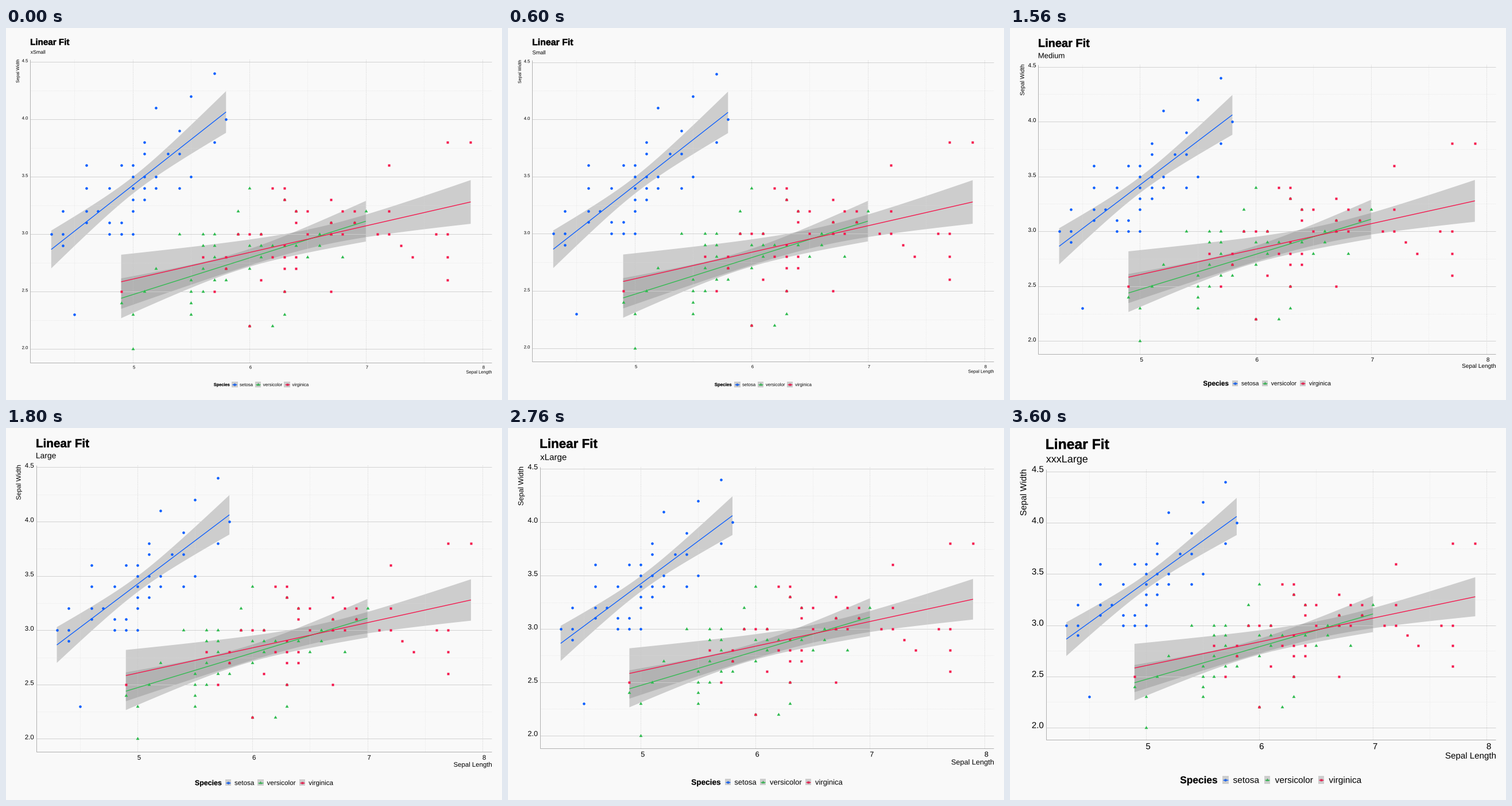
Write a matplotlib script that moves like this. It is 864 by 648 pixels and loops after 4.2 s.

```python
import numpy as np
import matplotlib.pyplot as plt
from matplotlib.animation import FuncAnimation
from matplotlib.patches import PathPatch, Rectangle
from matplotlib.path import Path
from matplotlib.textpath import TextPath

W, H = 864, 648
RIGHT = 846
XLIM, YLIM = (4.12, 8.08), (1.88, 4.52)
BACK, RIBBON = "#f9f9f9", "#8b8b8b"
TRIANGLE = [(0, 1.5546), (1.3464, -0.7773), (-1.3464, -0.7773), (0, 1.5546)]
T_CRIT = 2.0106

# Sepal length -> sepal widths, in millimetres
SETOSA = {
    43: [30], 44: [29, 30, 32], 45: [23], 46: [31, 32, 34, 36], 47: [32],
    48: [30, 31, 34], 49: [30, 31, 36], 50: [30, 32, 33, 34, 35, 36],
    51: [33, 34, 35, 37, 38], 52: [34, 35, 41], 53: [37], 54: [34, 37, 39],
    55: [35, 42], 57: [38, 44], 58: [40],
}
VERSICOLOR = {
    49: [24], 50: [20, 23], 51: [25], 52: [27], 54: [30],
    55: [23, 24, 25, 26], 56: [25, 27, 29, 30], 57: [26, 28, 29, 30],
    58: [26, 27], 59: [30, 32], 60: [22, 27, 29, 34], 61: [28, 29, 30],
    62: [22, 29], 63: [23, 25, 33], 64: [29, 32], 65: [28], 66: [29, 30],
    67: [30, 31], 68: [28], 69: [31], 70: [32],
}
VIRGINICA = {
    49: [25], 56: [28], 57: [25], 58: [27, 28], 59: [30], 60: [22, 30],
    61: [26, 30], 62: [28, 34], 63: [25, 27, 28, 29, 33, 34],
    64: [27, 28, 31, 32], 65: [30, 32], 67: [25, 30, 31, 33], 68: [30, 32],
    69: [31, 32], 71: [30], 72: [30, 32, 36], 73: [29], 74: [28], 76: [30],
    77: [26, 28, 30, 38], 79: [38],
}

# fit: intercept, slope, mean x, sum of squares of x, residual error
SPECIES = [
    dict(name="setosa", data=SETOSA, color="#0b5fff", marker="o", ms=4.6,
         fit=(-0.5694, 0.7985, 5.006, 6.088, 0.2566)),
    dict(name="versicolor", data=VERSICOLOR, color="#2fbb4f", marker=TRIANGLE,
         ms=6.8, fit=(0.8721, 0.3197, 5.936, 13.056, 0.2697)),
    dict(name="virginica", data=VIRGINICA, color="#f5134a", marker="s", ms=4.4,
         fit=(1.4461, 0.2319, 6.588, 19.813, 0.2898)),
]

# panel: left, top, bottom; title and sub: size, baseline; axis: text size
# legend: centre y, title size, title x, label offset, key centres
SIZES = [
    dict(name="xSmall", panel=(42.3, 54.7, 582.5), title=(15.2, 29.5),
         sub=(8.7, 44.8), axis=7.64,
         legend=(621, 7.4, 362, 8.9, (398.3, 438.8, 489.6))),
    dict(name="Small", panel=(42.3, 55.7, 581.4), title=(15.9, 30),
         sub=(9.3, 45.8), axis=7.64,
         legend=(620.9, 7.9, 360, 9, (399.3, 440, 491.2))),
    dict(name="Medium", panel=(49.4, 63.7, 568.4), title=(20, 33),
         sub=(13.1, 52.5), axis=10.1,
         legend=(618.7, 11.8, 336.7, 11, (392.2, 443.8, 510))),
    dict(name="Large", panel=(52.5, 64.5, 564.2), title=(20.7, 33.6),
         sub=(13.9, 52.7), axis=11.4,
         legend=(617.7, 12.4, 329.3, 11.2, (387.1, 443.4, 516))),
    dict(name="xLarge", panel=(55.8, 67.5, 558.1), title=(22.4, 34.7),
         sub=(15.1, 55.8), axis=12.7,
         legend=(616.6, 13.6, 319.6, 11.9, (382.8, 444.2, 523.2))),
    dict(name="xxLarge", panel=(59.1, 69.6, 551.9), title=(23.7, 35.6),
         sub=(16.4, 57.8), axis=13.9,
         legend=(615.3, 14.8, 310.3, 12.3, (378.6, 445.6, 531))),
    dict(name="xxxLarge", panel=(62.5, 72.4, 543.4), title=(24.7, 36.5),
         sub=(18, 60), axis=15.1,
         legend=(612.7, 17.3, 296.7, 13.5, (375.4, 448.2, 542))),
]

fig = plt.figure(figsize=(W / 72, H / 72), dpi=72, facecolor=BACK)
ax = fig.add_axes([0, 0, 1, 1])


def write(x, y, text, size, align="left", bold=0, upright=False):
    """Set text by its inked edge and baseline; upright text ends at y."""
    weight = "bold" if bold else "normal"
    path = TextPath((0, 0), text, size=size,
                    prop=dict(family="Liberation Sans", weight=weight))
    v = path.vertices
    ink = path.get_extents()
    along = v[:, 0] - (ink.x0 if align == "left" else ink.x1)
    if upright:
        pts = np.column_stack([x - v[:, 1], y - along])
    else:
        pts = np.column_stack([x + along, y - v[:, 1]])
    ax.add_patch(PathPatch(Path(pts, path.codes), fc="black", ec="black",
                           lw=bold, zorder=5))


def segment(x, y, color, width, dash=None):
    ax.plot(x, y, color=color, lw=width, ls=(0, dash) if dash else "-",
            solid_capstyle="butt", dash_capstyle="butt")


def points(x, y, kind):
    ax.plot(x, y, ls="none", marker=kind["marker"], ms=kind["ms"],
            mfc=kind["color"], mec="none")


def draw_grid(px, py, left, top, bottom):
    for v in np.arange(2.25, 4.5, 0.5):
        segment([left, RIGHT], [py(v)] * 2, "#dcdcdc", 0.7, (1, 2))
    for v in np.arange(4.5, 8, 1):
        segment([px(v)] * 2, [top, bottom], "#dcdcdc", 0.7, (1, 2))
    for v in np.arange(2, 4.6, 0.5):
        segment([left, RIGHT], [py(v)] * 2, "#cecece", 0.9)
    for v in range(5, 9):
        segment([px(v)] * 2, [top, bottom], "#c4c4c4", 0.9, (1, 2))
    segment([left, left, RIGHT], [top, bottom, bottom], "#b0b0b0", 1)


def draw_fit(px, py, kind):
    a, b, mean, sxx, err = kind["fit"]
    x = np.linspace(min(kind["data"]) / 10, max(kind["data"]) / 10, 80)
    y = a + b * x
    band = T_CRIT * err * np.sqrt(1 / 50 + (x - mean) ** 2 / sxx)
    ax.fill_between(px(x), py(y - band), py(y + band), fc=RIBBON, alpha=0.4, lw=0)
    segment(px(x), py(y), kind["color"], 1.35)


def draw_legend(size, legend):
    cy, title_size, title_x, offset, keys = legend
    text_size = size * 1.025
    write(title_x, cy + 0.36 * title_size, "Species", title_size, bold=0.2)
    kw, kh = 10.4, max(10.3, 0.9 * text_size)
    for kind, kx in zip(SPECIES, keys):
        points([kx], [cy], kind)
        ax.add_patch(Rectangle((kx - kw / 2, cy - kh / 2), kw, kh, fc=RIBBON,
                               alpha=0.4, lw=0, zorder=2))
        segment([kx - 4.1, kx + 4.1], [cy, cy], kind["color"], 1.35)
        write(kx + offset, cy + 0.36 * text_size, kind["name"], text_size)


def draw(i):
    ax.cla()
    ax.set(xlim=(0, W), ylim=(H, 0))
    ax.axis("off")
    look = SIZES[i]
    left, top, bottom = look["panel"]
    size = look["axis"]

    def px(v):
        return left + (v - XLIM[0]) / (XLIM[1] - XLIM[0]) * (RIGHT - left)

    def py(v):
        return bottom - (v - YLIM[0]) / (YLIM[1] - YLIM[0]) * (bottom - top)

    draw_grid(px, py, left, top, bottom)
    for kind in SPECIES:
        xy = np.array([(x, y) for x, ys in kind["data"].items() for y in ys]) / 10
        points(px(xy[:, 0]), py(xy[:, 1]), kind)
    for kind in SPECIES:
        draw_fit(px, py, kind)

    for v in np.arange(2, 4.6, 0.5):
        write(left - 4.3, py(v) + 0.8, f"{v:.1f}", size, "right")
    base = bottom + 5.8 + 0.68 * size
    for v in range(5, 9):
        write(px(v) + 0.4, base, str(v), size)
    write(RIGHT, base + 1.08 * size, "Sepal Length", size, "right")
    write(17.3 + 0.73 * size, top + 0.3, "Sepal Width", size, "right", upright=True)

    title_size, title_y = look["title"]
    write(left + 0.8, title_y, "Linear Fit", title_size, bold=0.5)
    sub_size, sub_y = look["sub"]
    write(left + 0.5, sub_y, look["name"], sub_size)
    draw_legend(size, look["legend"])
    return []


anim = FuncAnimation(fig, draw, frames=len(SIZES), interval=600,
                     repeat=True, repeat_delay=0, blit=False)
plt.show()
```
